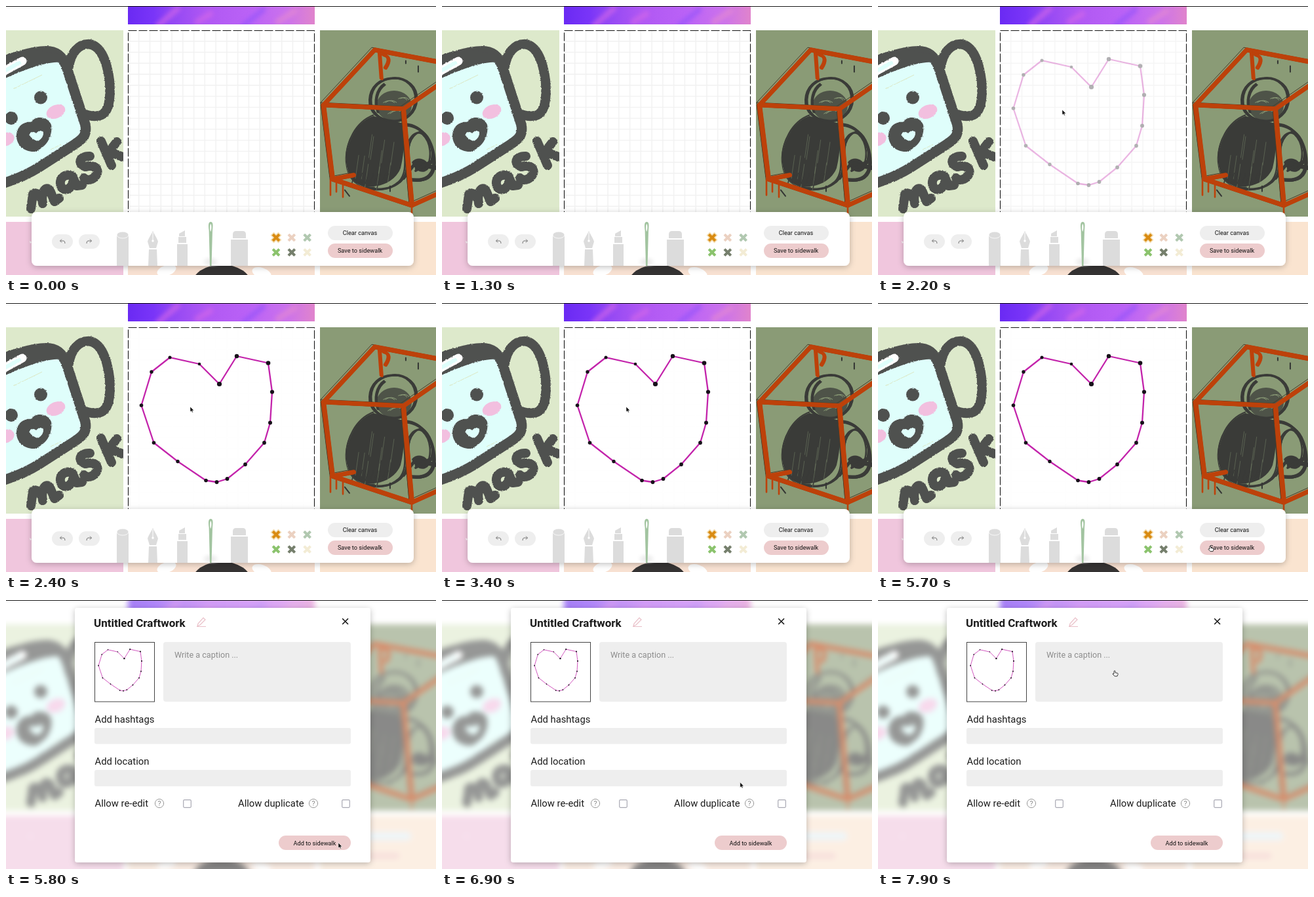
Animation of 656 by 410 pixels, one loop 8000 ms. Source, as an HTML page:

```html
<!DOCTYPE html>
<html lang="en">
<head>
<meta charset="utf-8">
<title>Craft canvas</title>
<style>
  html, body { margin: 0; width: 100%; height: 100%; overflow: hidden; background: #fff; }
  svg { display: block; width: 656px; height: 410px; }
  text { font-family: Roboto, "Open Sans", sans-serif; fill: #1c1c1c; }
  .ink { fill: none; stroke: #505150; stroke-linecap: round; stroke-linejoin: round; }
  .label { font-size: 14.8px; }
  .button { font-size: 9.2px; text-anchor: middle; fill: #111; }
  .blurred { filter: blur(4.5px); }
</style>
</head>
<body>
<svg viewBox="0 0 656 410">
  <defs>
    <linearGradient id="paint">
      <stop offset="0" stop-color="#6a2af3"/><stop offset=".14" stop-color="#7a35f8"/>
      <stop offset=".24" stop-color="#9348f4"/><stop offset=".42" stop-color="#b058f3"/>
      <stop offset=".65" stop-color="#ba62f6"/><stop offset=".85" stop-color="#cb72ec"/>
      <stop offset="1" stop-color="#e084cc"/>
    </linearGradient>
    <filter id="rough" x="-10%" y="-10%" width="120%" height="120%">
      <feTurbulence type="fractalNoise" baseFrequency=".4" numOctaves="2" seed="4"/>
      <feDisplacementMap in="SourceGraphic" scale="2.5" xChannelSelector="R" yChannelSelector="G"/>
    </filter>
    <filter id="soft" x="-30%" y="-30%" width="160%" height="160%"><feGaussianBlur stdDeviation="3"/></filter>
    <filter id="shadow" x="-10%" y="-25%" width="120%" height="150%">
      <feDropShadow dx="0" dy="2" stdDeviation="5" flood-opacity=".25"/>
    </filter>
    <clipPath id="leftCard"><rect x="-40" y="37" width="219" height="284"/></clipPath>
    <clipPath id="rightCard"><rect x="479" y="37" width="220" height="284"/></clipPath>
    <clipPath id="strip"><rect x="186" y="-20" width="285" height="48"/></clipPath>
    <g id="heart"></g>
  </defs>

  <g id="page">
    <rect x="-40" y="-40" width="740" height="500" fill="#fff"/>
    <g clip-path="url(#strip)">
      <rect x="186" y="-20" width="285" height="48" fill="url(#paint)"/>
      <g fill="none" stroke-linecap="round" stroke-width="9" opacity=".6" filter="url(#soft)">
        <path d="M232 30 L262 4 M292 24 L312 12" stroke="#d568e8"/>
        <path d="M362 30 L392 6" stroke="#9352fb"/>
        <path d="M415 24 L440 8" stroke="#e58ad0"/>
      </g>
    </g>

    <g clip-path="url(#leftCard)">
      <rect x="-40" y="37" width="219" height="284" fill="#dde9cb"/>
      <g filter="url(#rough)">
        <path class="ink" stroke-width="14.5" d="M96 92 C99 71 111 58 126 58 C146 60 155 88 158 115 C160 143 157 163 143 167 C134 169 124 167 116 163"/>
        <path class="ink" stroke-width="15.5" style="fill:#dffefb" d="M-30 96 C0 80 45 67 66 69 C82 71 88 81 93 95 L121 181 C124 197 117 203 103 212 L50 246 C28 260 0 270 -30 278"/>
        <path fill="#505150" d="M-40 86 L40 66 L84 74 L88 86 C62 84 36 92 -40 128 Z"/>
        <path d="M-8 102 L25 84" fill="none" stroke="#fff" stroke-width="13" stroke-linecap="round"/>
        <path d="M-8 102 L20 87" fill="none" stroke="#dffefb" stroke-width="6" stroke-linecap="round"/>
        <path d="M12 126 L55 105 M68 219 L84 211" fill="none" stroke="#dce8c4" stroke-width="1"/>
        <g fill="#f2bfdf">
          <ellipse cx="76" cy="161" rx="15" ry="10" transform="rotate(-24 76 161)"/>
          <ellipse cx="0" cy="203" rx="13" ry="10" transform="rotate(-24 0 203)"/>
        </g>
        <g fill="#505150">
          <circle cx="8" cy="171" r="10"/><circle cx="53" cy="139.5" r="10"/>
          <path d="M39 177 C43 167 64 167 69 181 C72 201 59 217 44 222 C29 223 16 213 16 198 C16 183 28 175 39 177 Z"/>
        </g>
        <path fill="#dffefb" d="M35 196 Q41 189 46 194 Q52 187 57 192 Q58 200 49 206 Q40 204 35 196 Z"/>
        <path class="ink" stroke-width="14" d="M38 309 L41 287 C47 282 54 289 56 301 C53 283 61 273 67 281 L74 298 L81 293
          M101 259 C86 254 79 267 85 277 C94 285 106 273 101 259 L108 274 L116 273
          M128 229 C112 228 108 241 121 245 C138 241 145 251 135 261 C129 266 123 266 119 262
          M145 206 L161 243 M169 207 L155 225 C164 222 170 228 181 231"/>
      </g>
    </g>

    <g clip-path="url(#rightCard)">
      <rect x="479" y="37" width="220" height="284" fill="#8a9b76"/>
      <g id="figure">
        <path fill="#3a3b38" d="M561 168 C538 174 519 207 520 235 C520 262 533 277 558 275 C578 275 596 263 602 247 C608 222 609 195 602 178 Z"/>
        <ellipse cx="592" cy="152" rx="27" ry="23" fill="#3a3b38" opacity=".75"/>
        <path fill="#3a3b38" d="M619 238 C627 228 643 232 646 246 C640 257 625 255 619 238 Z"/>
      </g>
      <g id="cube"></g>
    </g>

    <rect x="-40" y="329" width="219" height="130" fill="#f0c6dd"/>
    <rect x="186" y="329" width="285" height="130" fill="#f8e1d2"/>
    <rect x="479" y="329" width="220" height="130" fill="#fae4d0"/>
    <ellipse cx="329" cy="426" rx="46" ry="32" fill="#353333"/>
    <g fill="#fff">
      <ellipse cx="245" cy="403" rx="15" ry="8" transform="rotate(-18 245 403)"/>
      <ellipse cx="390" cy="407" rx="15" ry="8" transform="rotate(18 390 407)"/>
      <path d="M36 358 l3 2 l-2 2 z"/>
    </g>
    <path d="M548 360 H612" stroke="#e3eef3" stroke-width="13" stroke-linecap="round"/>
    <path d="M548 390 H596" stroke="#f1c9c4" stroke-width="9" stroke-linecap="round"/>

    <rect x="186" y="37" width="285" height="285" fill="#fff"/>
    <path id="grid" fill="none" stroke="#f1f1f1" stroke-width="1.4"/>
    <rect x="186.5" y="37.5" width="284" height="284" fill="none" stroke="#151515" stroke-width="1.1" stroke-dasharray="13 3"/>
    <use id="drawing" href="#heart"/>
  </g>

  <g id="toolbar">
    <rect x="39" y="314" width="583" height="82" rx="8" fill="#fff" filter="url(#shadow)"/>
    <g fill="#eeeeee">
      <rect x="70" y="348" width="32" height="22" rx="11"/><rect x="111" y="348" width="32" height="22" rx="11"/>
      <rect x="491" y="335" width="99" height="22" rx="11"/>
    </g>
    <rect x="491" y="362" width="99" height="22" rx="11" fill="#edcccd"/>
    <g fill="none" stroke="#777" stroke-width="1">
      <path id="undo" d="M85 355.5 L82.5 358 L85 360.5 M82.5 358 H88 Q90 358 90 362"/>
      <use href="#undo" transform="matrix(-1 0 0 1 213 0)"/>
    </g>
    <g fill="#dcdcdc">
      <path d="M169 349 V396 H187 V349 Z"/>
      <ellipse cx="178" cy="349" rx="9" ry="5" stroke="#fff" stroke-width=".8"/>
      <path d="M224 343 C227 349 231 355 232 359 L229 369 H219 L216 359 C217 355 221 349 224 343 Z M218 371 H230 L231 396 H217 Z"/>
      <path d="M264 347 L273 342 V351 H264 Z M263 352 H275 V361 H263 Z M261 363 H277 V396 H261 Z"/>
      <path d="M346 354 V348 Q346 343 351 343 H361 Q366 343 366 348 V354 Z M343 356 H369 V396 H343 Z"/>
    </g>
    <path d="M224 345 V357" stroke="#fff" stroke-width="1"/><circle cx="224" cy="358" r="1.7" fill="#fff"/>
    <ellipse cx="312" cy="390" rx="10" ry="5" fill="#e9e9e9" filter="url(#soft)"/>
    <path fill="#a2c4a0" fill-rule="evenodd" d="M312.3 329 C316 329 316 334 315 342 L313.5 396 H311 L309.6 342 C308.6 334 308.6 329 312.3 329 Z M312.3 332 C310.6 334 310.9 341 312.3 344 C313.7 341 314 334 312.3 332 Z"/>
    <g id="swatches" stroke-width="4" stroke-linecap="square"></g>
    <text class="button" x="540" y="349.3">Clear canvas</text>
    <text class="button" x="540" y="376.3">Save to sidewalk</text>
  </g>

  <g id="modal">
    <rect width="656" height="410" fill="#fff" opacity=".4"/>
    <rect x="105" y="12" width="451" height="388" rx="4" fill="#fff" filter="url(#shadow)"/>
    <text x="134" y="40.5" font-size="17" font-weight="700">Untitled Craftwork</text>
    <path d="M292 40 L293 36 L301 27 L304 30 L296 38 Z M291 40.5 H305" fill="none" stroke="#e9bfc8" stroke-width="1.2"/>
    <path d="M513.2 28.2 L522 37 M522 28.2 L513.2 37" stroke="#111" stroke-width="1.5"/>
    <rect x="135.5" y="64.5" width="91" height="90.5" fill="#fff" stroke="#444"/>
    <use href="#heart" transform="translate(73 48.4) scale(.33)"/>
    <g fill="#eeeeee">
      <rect x="240" y="64" width="286" height="91" rx="4"/>
      <rect x="135" y="195" width="391" height="24.5" rx="3"/>
      <rect x="135" y="259" width="391" height="25" rx="3"/>
    </g>
    <text x="257" y="88" font-size="12.6" style="fill:#8d8d8d">Write a caption ...</text>
    <text class="label" x="135.5" y="186.5">Add hashtags</text>
    <text class="label" x="135.5" y="250.5">Add location</text>
    <text class="label" x="135.5" y="315">Allow re-edit</text>
    <text class="label" x="354" y="315">Allow duplicate</text>
    <g id="help">
      <circle cx="234" cy="310" r="6.6" fill="none" stroke="#999"/>
      <text x="234" y="313.8" font-size="10.5" text-anchor="middle" style="fill:#888">?</text>
    </g>
    <use href="#help" x="235"/>
    <rect id="checkbox" x="270.7" y="304.7" width="11.6" height="11.6" rx="1.5" fill="#fff" stroke="#a9a9b3" stroke-width="1.2"/>
    <use href="#checkbox" x="242"/>
    <rect x="416" y="359" width="110" height="22" rx="11" fill="#edcccd"/>
    <text class="button" x="471" y="373.6">Add to sidewalk</text>
  </g>

  <rect width="656" height="1" fill="#161616"/>
  <g id="cursor">
    <path id="arrow" d="M0 0 V8 L1.8 6.4 L3 9 L4.4 8.4 L3.2 5.9 H5.7 Z" fill="#000" stroke="#fff" stroke-width=".6"/>
    <path id="hand" d="M-1 1 Q0 -.6 1 1 V3.4 L4.6 4 Q5.4 4.4 5 6 L4 8.6 H0 L-3 5.4 Q-3 4 -1 5 Z" fill="#fff" stroke="#222" stroke-width=".9"/>
  </g>
</svg>

<script>
const LOOP = 8000;
const OPEN_AT = 5750;
const $ = id => document.getElementById(id);
const clamp = v => Math.max(0, Math.min(1, v));

function add(parent, tag, attrs) {
  const node = document.createElementNS("http://www.w3.org/2000/svg", tag);
  for (const key in attrs) node.setAttribute(key, attrs[key]);
  return parent.appendChild(node);
}

let seed = 11;
const random = () => (seed = seed * 16807 % 2147483647) / 2147483647;
const jitter = amount => (random() - .5) * 2 * amount;

// Repeats a path with small offsets, like loose pencil passes.
function sketch(parent, d, stroke, width, passes, spread) {
  for (let i = 0; i < passes; i++) {
    add(parent, "path", { d, fill: "none", stroke, "stroke-width": width, "stroke-linecap": "round",
      "stroke-linejoin": "round", transform: `translate(${jitter(spread)} ${jitter(spread)})` });
  }
}

function buildGrid() {
  const step = 285 / 17;
  let d = "";
  for (let i = 1; i < 17; i++) d += `M${186 + i * step} 38V321M187 ${37 + i * step}H470`;
  $("grid").setAttribute("d", d);
}

function buildHeart() {
  const points = [[250, 83, 2.5], [295, 93, 2.3], [325.5, 123.5, 3.6], [352, 81, 3.2], [400, 91.5, 3.3],
    [406, 135.5, 3.1], [403, 182.5, 3], [394, 213, 2.9], [365, 246, 2.9], [337.5, 268, 2.9], [321.5, 273, 2.9],
    [305, 270.5, 2.8], [262, 241.5, 2.7], [225.5, 213, 2.8], [206.5, 156, 2.8], [222, 105, 2.7]];
  add($("heart"), "polygon", { points: points.map(p => p.slice(0, 2)).join(" "), fill: "none",
    stroke: "#c323ab", "stroke-width": 2.3, "stroke-linejoin": "round" });
  for (const [cx, cy, r] of points) add($("heart"), "circle", { cx, cy, r, fill: "#17111a" });
}

function buildFigure() {
  const ink = "#3a3b38", grass = "#8a9b76", figure = $("figure");
  sketch(figure, "M590 111 C612 109 627 124 626 143 C625 163 609 178 590 176 C570 175 555 162 556 143 C557 124 570 112 590 111", ink, 2, 5, 2);
  sketch(figure, "M578 119 C566 127 562 146 568 161", ink, 2.5, 3, 2);
  sketch(figure, "M561 168 C534 178 517 210 520 238 C522 263 538 278 562 276", ink, 1.2, 4, 2.5);
  sketch(figure, "M602 181 C634 178 653 203 654 238 C654 260 641 269 615 264", ink, 3, 4, 2);
  sketch(figure, "M612 225 C612 202 626 187 637 195 C650 207 652 231 643 246 M608 210 C612 240 612 262 596 271 C582 281 562 281 549 277", ink, 2.6, 3, 2);
  sketch(figure, "M621 240 L655 247 M624 250 L648 238 M606 262 L620 244", ink, 3.5, 3, 2);
  sketch(figure, "M577 146 Q586 140 594 146 M600 140 Q608 136 613 142 M584 163 Q594 155 606 160", grass, 1, 2, 2);
  for (let i = 0; i < 10; i++) {
    const x = 530 + i * 6 + jitter(2);
    sketch(figure, `M${x} 255 L${x - 5} ${270 + jitter(7)}`, ink, 1.6, 1, 1);
    sketch(figure, `M${x + 8} ${220 + jitter(25)} l-5 35`, grass, .4, 1, 2);
  }
}

function buildCube() {
  const cube = $("cube"), orange = "#bd410a";
  const edges = "M690 91 L562 67 L484 151 L606 157 L690 99 M484 151 L498 264 L619 304 L606 157 M619 304 L690 272 M498 264 L530 258";
  sketch(cube, edges, "#4a3b28", 1, 4, 4);
  sketch(cube, edges, orange, 6.2, 3, 1);
  sketch(cube, "M570 70 L573 111 M576 75 Q590 78 579 95", orange, 4.5, 2, 2);
  sketch(cube, "M495 264 V288 M504 268 V283 M514 272 V291 M619 300 V318", orange, 2.6, 1, 1);
  sketch(cube, "M517 281 L524 290 M610 84 V88 M629 92 V101 M586 275 V283", "#343633", 2, 1, 1);
}

function buildSwatches() {
  ["#d98b12", "#ebd1c1", "#b1c8b0", "#8bc36d", "#757f6c", "#f3ecd5"].forEach((stroke, i) => {
    const x = 412 + i % 3 * 23.8, y = 353 + Math.floor(i / 3) * 22.5;
    const d = `M${x - 3.5} ${y - 3.5}l7 7m0 -7l-7 7`;
    if (!i) add($("swatches"), "path", { d, stroke: "#f3dcae", "stroke-width": 7 });
    add($("swatches"), "path", { d, stroke });
  });
}

// [time, x, y]
const path = [[2400, 281, 158], [3500, 281, 158], [4300, 433, 268], [5200, 507, 370],
  [5750, 507, 370], [6500, 506, 371], [7500, 361, 107.5], [8000, 361, 107.5]];

function cursorAt(t) {
  const next = path.findIndex(p => p[0] > t);
  if (next < 1) return path[0].slice(1);
  const [t0, x0, y0] = path[next - 1], [t1, x1, y1] = path[next];
  const u = (t - t0) / (t1 - t0);
  const k = t0 === 3500 ? u * u * (2 - u) : t0 === 4300 ? u + u * u - u * u * u : u * u * (3 - 2 * u);
  return [x0 + (x1 - x0) * k, y0 + (y1 - y0) * k];
}

function show(id, visible) {
  const value = visible ? "inline" : "none";
  if ($(id).style.display !== value) $(id).style.display = value;
}

function render(t) {
  const open = t >= OPEN_AT;
  const dissolve = clamp((t - 2110) / 280);
  $("drawing").setAttribute("opacity", dissolve);
  $("grid").setAttribute("opacity", 1 - .9 * dissolve);
  $("page").classList.toggle("blurred", open);
  show("toolbar", !open);
  show("modal", open);

  const [x, y] = cursorAt(t);
  const hand = open ? y < 155 : y > 362;
  $("cursor").setAttribute("transform", `translate(${x} ${y})`);
  show("cursor", t >= 2050);
  show("hand", hand);
  show("arrow", !hand);
}

buildGrid();
buildHeart();
buildFigure();
buildCube();
buildSwatches();

const start = performance.now();
function tick() {
  render((performance.now() - start) % LOOP);
  requestAnimationFrame(tick);
}
render(0);
requestAnimationFrame(tick);
</script>
</body>
</html>
```
